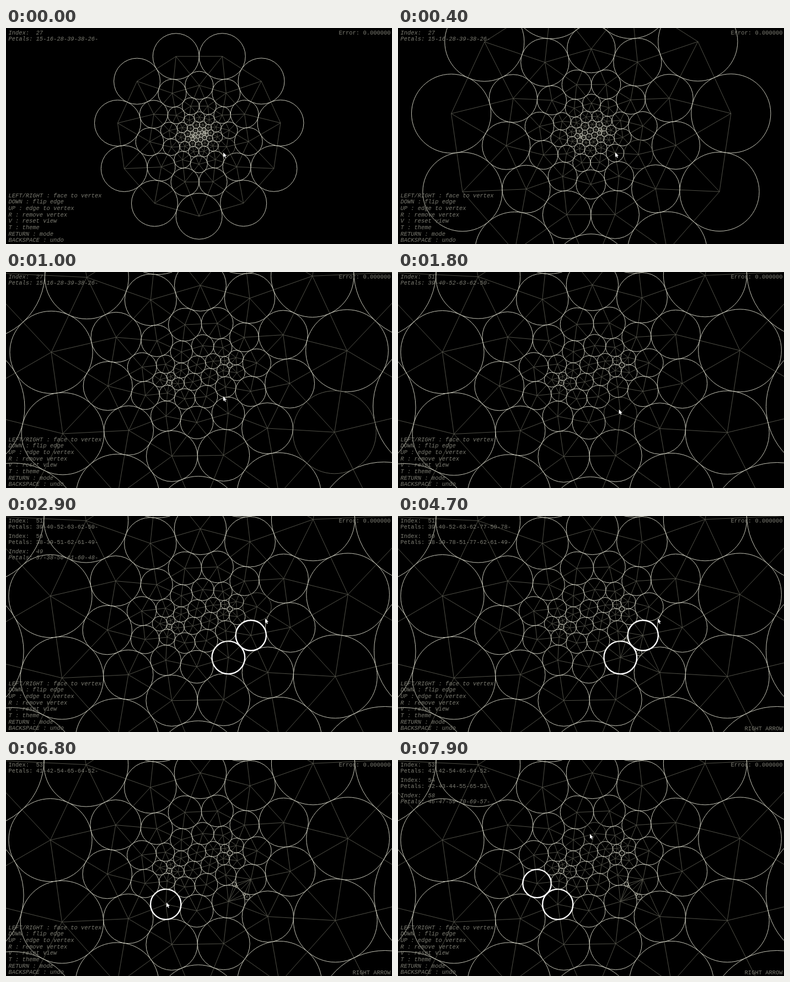
An HTML page with a canvas for the animation above (8 s loop, 700 px wide and 394 px high).

```html
<!DOCTYPE html>
<html lang="en">
<head>
<meta charset="utf-8">
<title>Circle packing</title>
<style>
  html, body { margin: 0; width: 100%; height: 100%; overflow: hidden; background: #000; }
  canvas { display: block; }
</style>
</head>
<body>
<canvas id="stage" width="700" height="394"></canvas>
<script>
const ctx = document.getElementById('stage').getContext('2d');
const COLS = 11, RINGS = 7, OUTER_RADIUS = 41.98, BASE = COLS * RINGS;
const CIRCLE = '#c6c6b8', EDGE = '#5a5a50', TEXT = '#7c7c72', SELECTED = '#ffffff';
const FONT = '10.45px "Liberation Mono", monospace';
const HELP = ['LEFT/RIGHT : face to vertex', 'DOWN : flip edge', 'UP : edge to vertex',
  'R : remove vertex', 'V : reset view', 'T : theme', 'RETURN : mode', 'BACKSPACE : undo'];

// Triangulation: rings of eleven vertices, the innermost closed by a zigzag.
const id = (ring, col) => ring * COLS + (col + COLS) % COLS;
const zigzag = [1, 10, 2, 9, 3, 8, 4, 7, 5];
const petals = [];
for (let v = COLS; v < BASE; v++) {
  const k = Math.floor(v / COLS), c = v % COLS;
  let inner = [id(k + 1, c + 1), id(k + 1, c)];
  if (k === RINGS - 1) {
    const i = zigzag.indexOf(c);
    const across = i < 0 ? [] : [zigzag[i - 1], zigzag[i + 1]].filter(d => d !== undefined);
    const turn = d => (d - c + COLS) % COLS;
    inner = across.sort((a, b) => turn(a) - turn(b)).map(d => id(k, d));
  }
  petals[v] = [id(k - 1, c - 1), id(k - 1, c), id(k, c + 1), ...inner, id(k, c - 1)];
}

// Radii: relax until the angles around every inner vertex sum to a full turn.
const radius = Array.from({ length: BASE }, (_, v) => OUTER_RADIUS * 0.6056 ** Math.floor(v / COLS));
const angleAt = (a, b, c) => 2 * Math.asin(Math.sqrt(b * c / ((a + b) * (a + c))));
for (let sweep = 0; sweep < 1500; sweep++) {
  for (let v = COLS; v < BASE; v++) {
    const ring = petals[v], n = ring.length, r = radius[v];
    const sum = ring.reduce((s, p, i) => s + angleAt(r, radius[p], radius[ring[(i + 1) % n]]), 0);
    const beta = Math.sin(sum / (2 * n)), delta = Math.sin(Math.PI / n);
    radius[v] = r * beta / (1 - beta) * (1 - delta) / delta;
  }
}

// Layout: walk outward, placing the petals of each vertex in turn.
const pos = [];
const heading = (a, b) => Math.atan2(pos[b].y - pos[a].y, pos[b].x - pos[a].x);
function placeBeside(a, b, angle) {
  const d = radius[a] + radius[b];
  pos[b] = { x: pos[a].x + d * Math.cos(angle), y: pos[a].y + d * Math.sin(angle) };
}
const start = 27;
pos[start] = { x: 0, y: 0 };
placeBeside(start, petals[start][0], 0);
const queue = [start], seen = new Set(queue);
for (const v of queue) {
  const ring = petals[v], n = ring.length;
  const first = ring.findIndex(p => pos[p]);
  let angle = heading(v, ring[first]);
  for (let i = 0; i < n; i++) {
    const p = ring[(first + i) % n], next = ring[(first + i + 1) % n];
    if (!pos[p]) placeBeside(v, p, angle);
    angle += angleAt(radius[v], radius[p], radius[next]);
    if (p >= COLS && !seen.has(p)) { seen.add(p); queue.push(p); }
  }
}

// Turn the rim to best fit a regular polygon standing on vertex 6, then centre its box.
const rim = pos.slice(0, COLS);
const mean = axis => rim.reduce((s, p) => s + p[axis], 0) / COLS;
const cx = mean('x'), cy = mean('y');
let along = 0, aside = 0;
rim.forEach((p, c) => {
  const x = p.x - cx, y = p.y - cy, ideal = Math.PI / 2 + (c - 6) * 2 * Math.PI / COLS;
  along += x * Math.cos(ideal) + y * Math.sin(ideal);
  aside += x * Math.sin(ideal) - y * Math.cos(ideal);
});
const spin = Math.atan2(aside, along);
for (const p of pos) {
  const x = p.x - cx, y = p.y - cy;
  p.x = x * Math.cos(spin) - y * Math.sin(spin);
  p.y = x * Math.sin(spin) + y * Math.cos(spin);
}
const middle = axis => {
  const values = rim.map(p => p[axis]);
  return (Math.min(...values) + Math.max(...values)) / 2;
};
const midX = middle('x'), midY = middle('y');
for (const p of pos) { p.x -= midX; p.y -= midY; }

const edges = [];
for (let v = 0; v < COLS; v++) edges.push([v, id(0, v + 1)]);
petals.forEach((ring, v) => ring.forEach(p => {
  if (p < COLS || p > v) edges.push([v, p]);
}));

// Vertices added in the faces on both sides of edge 51-50.
function addToFace(third, side) {
  const a = 51, b = 50, v = pos.length;
  const [i, j, k] = [a, b, third].map(u => 1 / radius[u]);
  radius[v] = 1 / (i + j + k + 2 * Math.sqrt(i * j + j * k + k * i));
  placeBeside(a, v, heading(a, b) + side * angleAt(radius[a], radius[b], radius[v]));
  petals[a].splice(petals[a].indexOf(b) + (side > 0 ? 1 : 0), 0, v);
  petals[b].splice(petals[b].indexOf(a) + (side > 0 ? 0 : 1), 0, v);
  edges.push([a, v], [b, v], [third, v]);
}
addToFace(62, -1);
addToFace(39, 1);
addToFace(77, -1);
addToFace(78, 1);

// Times in seconds; the zoom is logarithmic.
const zoomKeys = [[0.1, 0], [0.7, 1.081], [1, 1.592], [1.1, 1.598]];
const mouseKeys = [[1.2, 394, 227], [1.7, 400, 250], [2, 402, 252], [2.4, 444, 214], [2.5, 446, 212],
  [2.9, 470, 187], [3.1, 471, 187], [6.1, 471, 187], [6.7, 294, 262], [6.8, 291, 260],
  [7.2, 254, 224], [7.3, 254, 222], [7.9, 348, 135]];
const states = [
  { at: 0, selected: [], hover: 27, key: '', added: 0 },
  { at: 1.4, hover: 51 },
  { at: 1.9, selected: [51], hover: 0 },
  { at: 2.3, hover: 50 },
  { at: 2.5, selected: [51, 50], hover: 0 },
  { at: 2.7, hover: 49 },
  { at: 3.1, hover: 0 },
  { at: 3.5, key: 'LEFT ARROW', added: 1 },
  { at: 4.2, key: 'RIGHT ARROW', added: 2 },
  { at: 5, key: 'LEFT ARROW', added: 3 },
  { at: 5.5, key: 'RIGHT ARROW', added: 4 },
  { at: 6.2, selected: [] },
  { at: 6.6, hover: 53 },
  { at: 6.8, selected: [53], hover: 0 },
  { at: 7.1, hover: 54 },
  { at: 7.3, selected: [53, 54], hover: 0 },
  { at: 7.7, hover: 58 }
];

function track(keys, t) {
  const next = keys.findIndex(k => k[0] > t);
  if (next === 0) return keys[0].slice(1);
  if (next < 0) return keys[keys.length - 1].slice(1);
  const a = keys[next - 1], b = keys[next], u = (t - a[0]) / (b[0] - a[0]);
  return a.slice(1).map((n, i) => n + (b[i + 1] - n) * u);
}

function write(text, x, y, italic, align = 'left') {
  ctx.font = (italic ? 'italic ' : '') + FONT;
  ctx.textAlign = align;
  ctx.fillText(text, x, y);
}

function drawCursor(x, y) {
  ctx.beginPath();
  for (const [dx, dy] of [[0, 0], [0, 8.5], [2, 6.8], [3.4, 9.8], [4.8, 9.2], [3.5, 6.3], [6, 6.1]]) {
    ctx.lineTo(x + dx, y + dy);
  }
  ctx.closePath();
  ctx.fillStyle = '#fff';
  ctx.fill();
}

function draw(t) {
  const state = Object.assign({}, ...states.filter(s => s.at <= t + 1e-6));
  const count = BASE + state.added;
  const scale = Math.exp(track(zoomKeys, t)[0]);
  const sx = v => 350.2 + pos[v].x * scale, sy = v => 197.5 + pos[v].y * scale;

  ctx.fillStyle = '#000';
  ctx.fillRect(0, 0, 700, 394);

  ctx.beginPath();
  for (const [a, b] of edges) {
    if (b >= count) continue;
    ctx.moveTo(sx(a), sy(a));
    ctx.lineTo(sx(b), sy(b));
  }
  ctx.lineWidth = 0.9;
  ctx.strokeStyle = EDGE;
  ctx.stroke();

  for (let v = 0; v < count; v++) {
    const bold = state.selected.includes(v);
    ctx.beginPath();
    ctx.arc(sx(v), sy(v), radius[v] * scale, 0, 2 * Math.PI);
    ctx.lineWidth = bold ? 2.4 : 1;
    ctx.strokeStyle = bold ? SELECTED : v === state.hover ? EDGE : CIRCLE;
    ctx.stroke();
  }

  ctx.fillStyle = TEXT;
  ctx.textBaseline = 'alphabetic';
  const shown = state.hover ? [...state.selected, state.hover] : state.selected;
  shown.forEach((v, i) => {
    const italic = v === state.hover, y = 11.5 + 28 * i;
    write('Index:  ' + v, 4.5, y, italic);
    write('Petals: ' + petals[v].filter(p => p < count).join('-') + '-', 4.5, y + 11.8, italic);
  });
  HELP.forEach((line, i) => write(line, 4.5, 308.5 + 11.7 * i, true));
  write('Error: 0.000000', 697.5, 11.5, false, 'right');
  write(state.key, 697.5, 390.5, false, 'right');
  drawCursor(...track(mouseKeys, t));
}

const begin = performance.now();
function frame() {
  const elapsed = (performance.now() - begin) % 8000;
  draw(Math.floor(elapsed / 100) / 10);
  requestAnimationFrame(frame);
}
frame();
</script>
</body>
</html>
```
